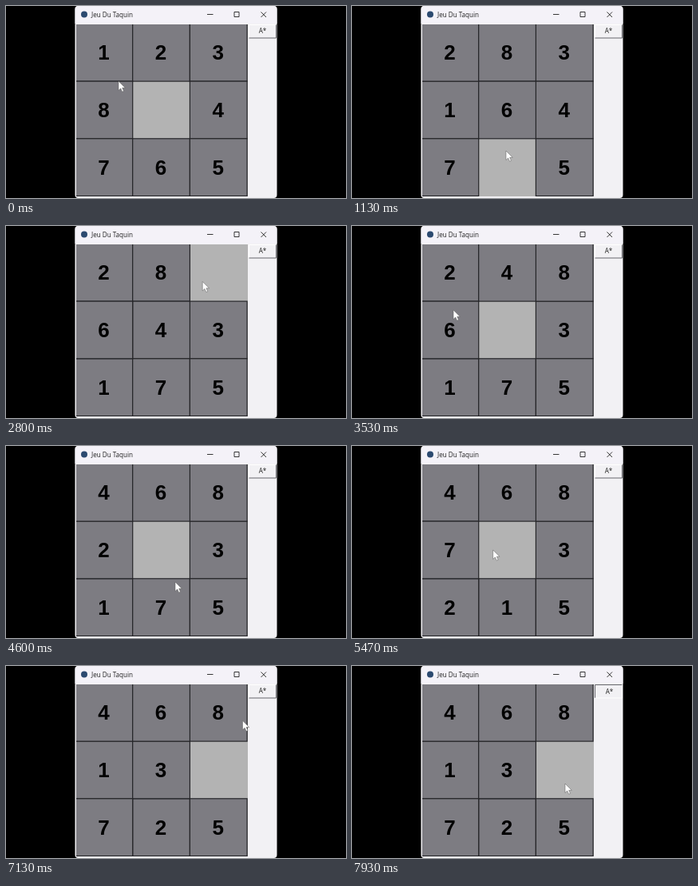
Recreate the animation shown at these times as an HTML page. Size 426 by 240 pixels, loop 8000 ms.

```html
<!DOCTYPE html>
<html lang="fr">
<head>
<meta charset="utf-8">
<title>Jeu Du Taquin</title>
<style>
  html, body { margin: 0; width: 100%; height: 100%; overflow: hidden; background: #000; }
  svg { display: block; width: 100%; height: 100%; }
  .tile rect { fill: #7d7c82; stroke: #252528; stroke-width: 1.2; }
  .tile text { font: bold 26px "Liberation Sans", Arial, sans-serif; text-anchor: middle; }
  .ui { font: 8.1px "Open Sans", sans-serif; fill: #222; }
  .line { fill: none; stroke: #222; stroke-width: .9; }
</style>
</head>
<body>
<svg viewBox="0 0 426 240">
  <clipPath id="canvas"><rect x="88" y="23" width="215" height="215"/></clipPath>

  <rect x="86.5" y="0" width="253" height="240" rx="4" fill="#f2f1f4"/>
  <path d="M86.5 22V4a4 4 0 0 1 4-4H335.5a4 4 0 0 1 4 4V22z" fill="#f4f2f8"/>
  <circle cx="98" cy="10.5" r="4" fill="#2c4a70"/>
  <text class="ui" x="107" y="13.7">Jeu Du Taquin</text>
  <path class="line" d="M252 10.5h7.5M286 7.5h6v6h-6zM319.5 7.5l6.5 6.5m0-6.5l-6.5 6.5"/>

  <g clip-path="url(#canvas)">
    <rect x="88" y="23" width="215" height="215" fill="#b3b3b3"/>
    <g id="board"></g>
  </g>

  <path id="lit" fill="none" d="M304.5 40V23.5H338.5"/>
  <path id="shade" fill="none" d="M304.5 40H338.5V23.5"/>
  <text class="ui" id="label" text-anchor="middle" x="321.5" y="34">A*</text>

  <path id="cursor" fill="#fff" stroke="#555" stroke-width=".5"
        d="M0 0V11.5L2.7 9L4.6 13.2L6.5 12.3L4.7 8.3H8.3z"/>
</svg>
<script>
const LOOP = 8000, FRAME = 1000 / 15;
const LEFT = 87, TOP = 22.4, CELL = 71.7;
const START = [1, 2, 3, 8, 0, 4, 7, 6, 5];
const STEP = { L: -1, R: 1, U: -3, D: 3 };
const PRESS = 7270;

// Each run moves the blank at an even pace, then the pointer arrives at `to`.
const RUNS = [
  { moves: "", until: 0, to: [141, 94] },
  { moves: "LURDD", until: 1130, to: [193, 181] },
  { moves: "LUR", until: 2130, to: [278, 146] },
  { moves: "RULD", until: 3530, to: [127, 105] },
  { moves: "LURD", until: 4600, to: [212, 170] },
  { moves: "DLURDLU", until: 6330, to: [165, 139] },
  { moves: "RR", until: 6930, to: [250, 138] },
  { moves: "", until: PRESS, to: [322, 30] },
  { moves: "", until: 7930, to: [267, 147] }
];

const $ = id => document.getElementById(id);
const clamp = u => Math.min(1, Math.max(0, u));
const smooth = u => u * u * (3 - 2 * u);
const mix = (a, b, u) => a.map((v, i) => v + (b[i] - v) * u);
const corner = i => [LEFT + (i % 3) * CELL, TOP + Math.floor(i / 3) * CELL];
const center = i => corner(i).map(v => v + CELL / 2);
const move = (el, [x, y]) => el.setAttribute("transform", `translate(${x} ${y})`);

// Play the runs once to get the pointer's stops and the board after each click.
const stops = [], boards = [{ time: 0, cells: START }];
let cells = START, clock = 0;
for (const { moves, until, to } of RUNS) {
  const pace = (until - clock) / moves.length;
  [...moves].forEach((dir, i) => {
    const time = clock + (i + 0.5) * pace;
    const blank = cells.indexOf(0), hit = blank + STEP[dir];
    cells = [...cells];
    [cells[blank], cells[hit]] = [cells[hit], 0];
    boards.push({ time, cells });
    stops.push({ time, at: mix(center(hit), center(blank), 0.25) });
  });
  stops.push({ time: until, at: to });
  clock = until;
}

const numbers = START.filter(Boolean);
$("board").innerHTML = numbers.map(n =>
  `<g class="tile"><rect width="${CELL}" height="${CELL}"/><text x="35.4" y="44.8">${n}</text></g>`
).join("");
const tiles = [...$("board").children];

function pointerAt(t) {
  const i = stops.findLastIndex(stop => stop.time <= t);
  const from = stops[i], to = stops[i + 1] || from;
  const u = clamp((t - from.time) / (to.time - from.time || 1));
  return mix(from.at, to.at, smooth(u));
}

function drawButton(pressed) {
  $("lit").setAttribute("stroke", pressed ? "#66666c" : "#fff");
  $("shade").setAttribute("stroke", pressed ? "#fff" : "#66666c");
  move($("label"), pressed ? [1, 1] : [0, 0]);
}

function draw(now) {
  const t = Math.floor((now % LOOP) / FRAME + 0.05) * FRAME;
  boards.findLast(board => board.time <= t).cells.forEach((n, i) => {
    if (n) move(tiles[numbers.indexOf(n)], corner(i));
  });
  drawButton(t >= PRESS);
  move($("cursor"), pointerAt(t));
}

const begin = performance.now();
function tick() {
  draw(performance.now() - begin);
  requestAnimationFrame(tick);
}
tick();
</script>
</body>
</html>
```
